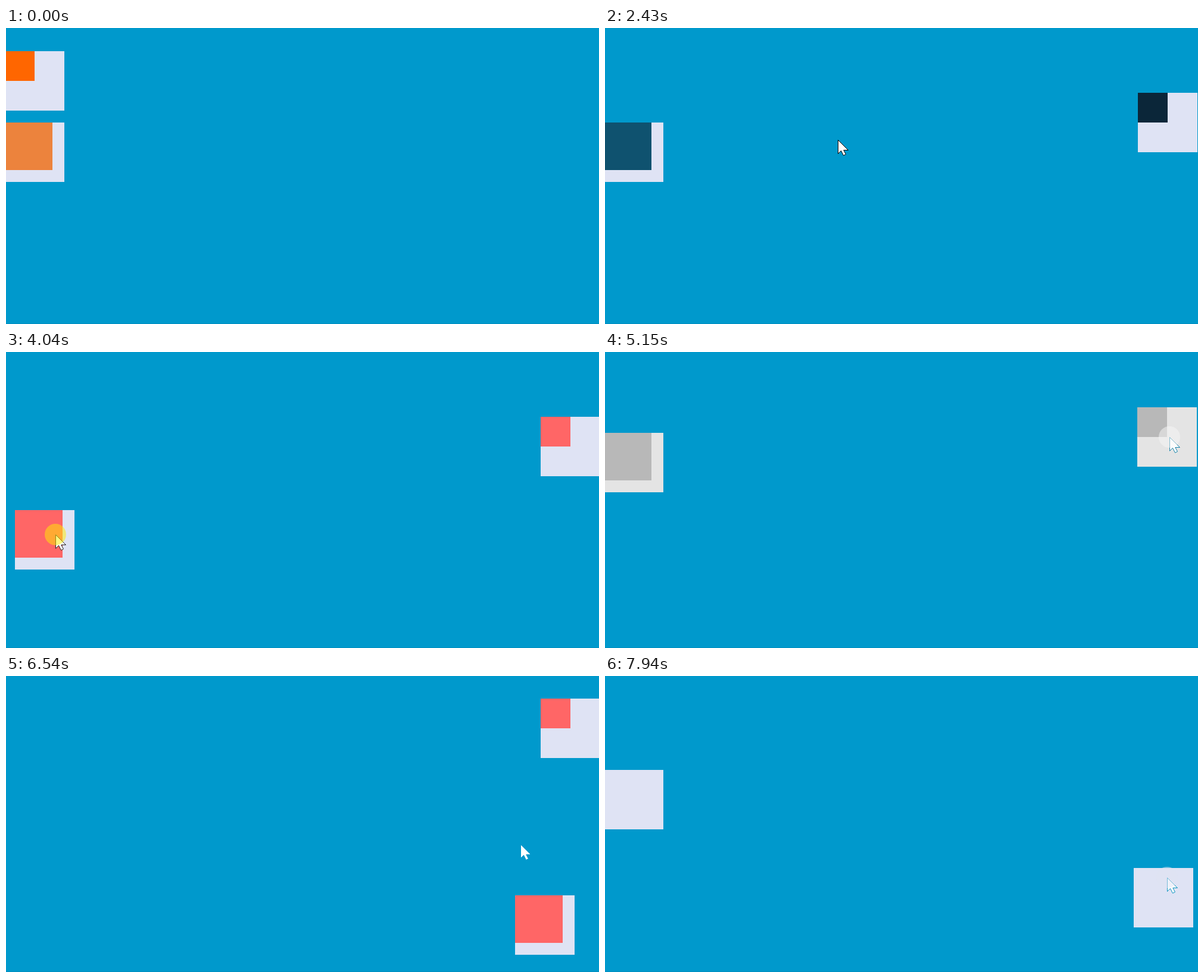
Recreate the animation shown at these times as an HTML page. Size 996 by 498 pixels, loop 8000 ms.

```html
<!DOCTYPE html>
<html lang="en">
<head>
<meta charset="utf-8">
<title>Draggable boxes that snap to the sides</title>
<style>
  html, body { margin: 0; width: 100%; height: 100%; overflow: hidden; background: #0099cc; }
  svg { display: block; width: 996px; height: 498px; }
</style>
</head>
<body>
<svg viewBox="0 0 996 498">
  <rect width="996" height="498" fill="#0099cc"/>
  <rect y="497" width="996" height="1" fill="#008dbe"/>
  <g id="small" shape-rendering="crispEdges">
    <rect width="100" height="100"/><rect width="50" height="50"/>
  </g>
  <g id="large" shape-rendering="crispEdges">
    <rect width="100" height="100"/><rect width="80" height="80"/>
  </g>
  <g id="pointer">
    <path d="M.5 .5V23.5L5.5 18.5L9.5 26.5L13.5 24.5L9.8 17.5H17.5Z" stroke-linejoin="round"/>
    <circle r="18" opacity=".5"/>
  </g>
</svg>
<script>
const LOOP = 8000, STEP = 69.7, LEAD = 17, LAST = 114;
const LEFT = -2, RIGHT = 898, MIDDLE = 448, SNAP_STEPS = 5;

const [small, large, pointer] = ["small", "large", "pointer"].map(id => document.getElementById(id));
const [arrow, halo] = pointer.children;

// The pointer comes along "via", takes the box at step "at" by the point "grip"
// and drags it along "path"; on release the box snaps to the nearer side.
// Way points: [step, x, y]
const gestures = [
  { box: small, at: 22, grip: [37, 45], path: [[31, 535, 109]],
    via: [[4, 661, 447], [6, 442, 388], [8, 442, 388], [16, 84, 118], [18, 84, 118]] },
  { box: large, at: 45, grip: [68, 41], path: [[54, 60, 273], [58, 15, 266], [63, 5, 136]],
    via: [[35, 391, 188]] },
  { box: small, at: 70, grip: [54, 50], path: [[74, 894, 93], [77, 890, 38]] },
  { box: large, at: 83, grip: [60, 50], path: [[92, 699, 369]] },
  { box: small, at: 96, grip: [47, 42], path: [[103, 519, 137], [105, 380, 158]],
    via: [[94, 864, 283]] },
  { box: large, at: 111, grip: [56, 16], path: [[LAST, 888, 323]] }
];

const phases = [
  { from: 0, ink: "#ff6600", inkLarge: "#ec833d", halo: "#ffee00", line: "#77736d" },
  { from: 25, ink: "#0b2639", inkLarge: "#0f526f", halo: "#ffffff", line: "#000000" },
  { from: 46, ink: "#ff6666", halo: "#ffee00", line: "#222222" },
  { from: 65, ink: "#b8b8b8", halo: "#f8f8f8", line: "#1682a8", paper: "#e4e4e4" },
  { from: 78, ink: "#ff6666", halo: "#ffee00", line: "#0099cc" },
  { from: 104, ink: "#dfe3f4", halo: "#dfe3f4", line: "#0c93c0" }
];

const smooth = k => k * k * (3 - 2 * k);
const easeOut = k => 1 - (1 - k) ** 3;
const last = list => list[list.length - 1];

function buildTracks() {
  const tracks = new Map([
    [small, [[0, LEFT, 39]]],
    [large, [[0, LEFT, 159]]],
    [pointer, []]
  ]);
  for (const { box, at, grip, path, via = [] } of gestures) {
    const track = tracks.get(box);
    const [, x, y] = last(track);
    const drag = [[at, x, y], ...path];
    const [end, endX, endY] = last(path);
    const side = endX < MIDDLE ? LEFT : RIGHT;
    track.push(...drag, [end + SNAP_STEPS, side, endY, easeOut]);
    const held = drag.map(([s, px, py]) => [s, px + grip[0], py + grip[1]]);
    tracks.get(pointer).push(...via, ...held);
  }
  return tracks;
}

function along(track, step) {
  const next = track.findIndex(key => key[0] > step);
  if (next < 0) return last(track).slice(1, 3);
  if (next === 0) return track[0].slice(1, 3);
  const [s0, x0, y0] = track[next - 1];
  const [s1, x1, y1, ease = smooth] = track[next];
  const k = ease((step - s0) / (s1 - s0));
  return [Math.round(x0 + (x1 - x0) * k), Math.round(y0 + (y1 - y0) * k)];
}

function paint(box, paper, ink) {
  box.children[0].setAttribute("fill", paper);
  box.children[1].setAttribute("fill", ink);
}

function show(node, visible) {
  node.setAttribute("visibility", visible ? "visible" : "hidden");
}

const tracks = buildTracks();

function draw(time) {
  const step = Math.min(LAST, Math.floor((time % LOOP + LEAD) / STEP));
  for (const [part, track] of tracks) {
    part.setAttribute("transform", `translate(${along(track, step)})`);
  }

  const phase = last(phases.filter(p => p.from <= step));
  const { ink, inkLarge = ink, paper = "#dfe3f4" } = phase;
  paint(small, paper, ink);
  paint(large, paper, inkLarge);
  arrow.setAttribute("fill", "#ffffff");
  arrow.setAttribute("stroke", phase.line);
  halo.setAttribute("fill", phase.halo);

  const pressed = gestures.some(g => step > g.at && step <= last(g.path)[0]);
  show(arrow, step >= tracks.get(pointer)[0][0]);
  show(halo, pressed);
}

const start = performance.now();
function tick() {
  draw(performance.now() - start);
  requestAnimationFrame(tick);
}
tick();
</script>
</body>
</html>
```
